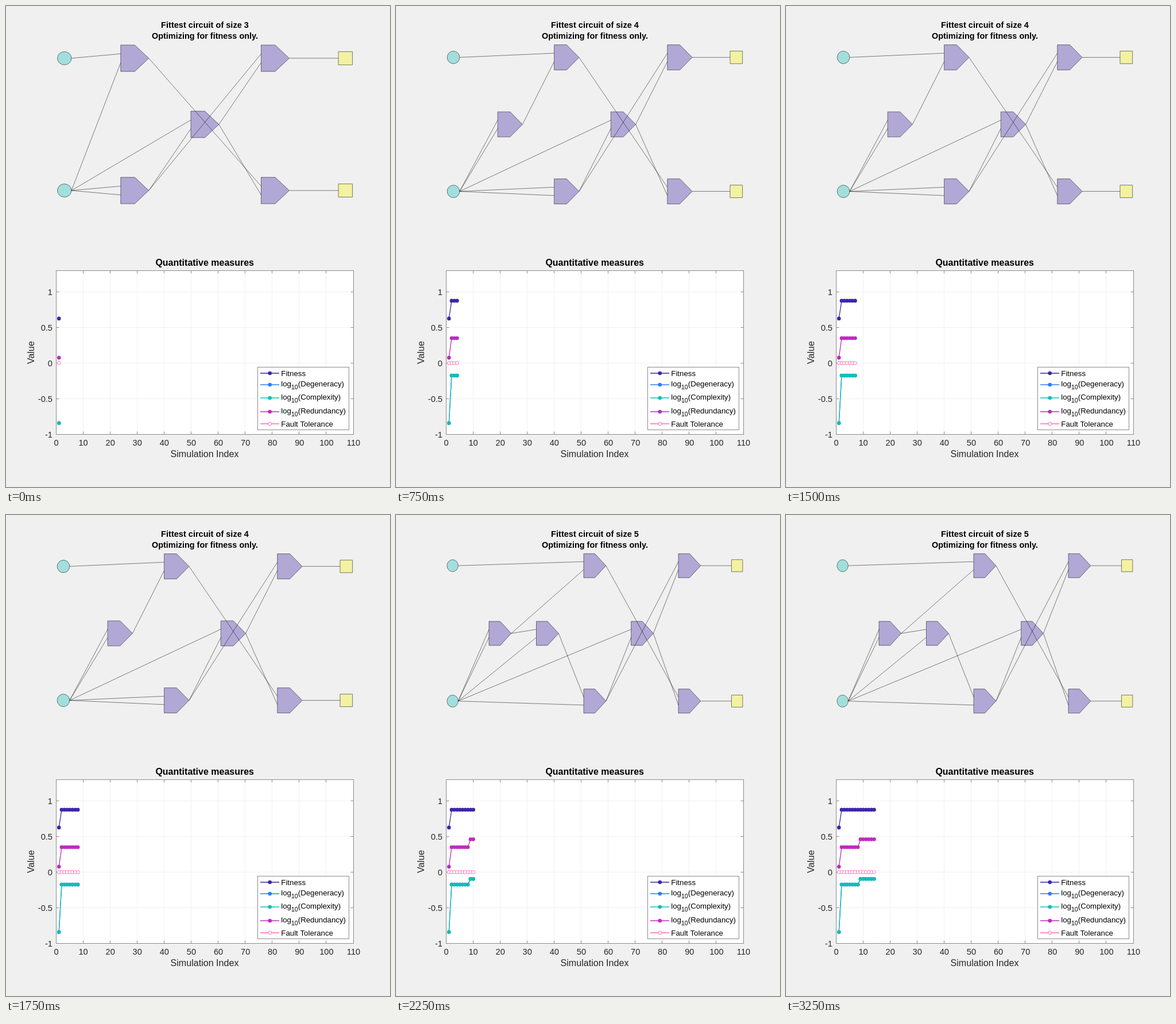
These frames come from a looping animation (669 px wide and 837 px high, 3500 ms). An HTML page with a canvas:

```html
<!DOCTYPE html>
<html lang="en">
<head>
<meta charset="utf-8">
<title>Fittest circuit</title>
<style>
  html, body { margin: 0; width: 100%; height: 100%; overflow: hidden; background: #f0f0f0; }
  canvas { display: block; }
</style>
</head>
<body>
<canvas id="stage" width="669" height="837"></canvas>
<script>
const ctx = document.getElementById('stage').getContext('2d');
const STEP = 250, STEPS = 14;
const FONT = '"Liberation Sans", Arial, sans-serif';
const MID = 206;

// Gates: [left edge, row]. Wires: from node, to gate, input 0 (upper) or 1 (lower).
const CIRCUITS = [
  {
    size: 3, from: 1, w: 48.9, h: 46, dy: 115.1, inX: 101.8, outX: 579.1,
    gates: { A: [199.8, -1], C: [199.8, 1], M: [322, 0], P: [444.5, -1], Q: [444.5, 1] },
    wires: 'aA0 bA1 bM0 bC0 bC1 AQ0 CM1 CP0 MP1 MQ1'
  },
  {
    size: 4, from: 2, w: 43.3, h: 43.7, dy: 116.6, inX: 100, outX: 582,
    gates: { A: [275.6, -1], B: [177.1, 0], C: [275.6, 1], M: [374.3, 0], P: [472.8, -1], Q: [472.8, 1] },
    wires: 'aA0 bB0 bB1 BA1 bM0 bC0 bC1 AQ0 CM1 CP0 MP1 MQ1'
  },
  {
    size: 5, from: 9, w: 38.8, h: 41.9, dy: 117.8, inX: 98.6, outX: 584.5,
    gates: { A: [327, -1], B: [162, 0], C: [327, 1], E: [244.5, 0], M: [409.6, 0], P: [492, -1], Q: [492, 1] },
    wires: 'aA0 bB0 bB1 BA1 BE0 bE1 bM0 EC0 bC1 AQ0 CM1 CP0 MP1 MQ1'
  }
];

// levels: [first index, value]
const SERIES = [
  { name: 'Fitness', color: '#3e26a8', y: 639, levels: [[1, .625], [2, .875]] },
  { name: '(Degeneracy)', log: true, color: '#2e7cf9', y: 659, levels: [[1, -.842], [2, -.175], [9, -.096]] },
  { name: '(Complexity)', log: true, color: '#12beb9', y: 682, levels: [[1, -.842], [2, -.175], [9, -.096]] },
  { name: '(Redundancy)', log: true, color: '#bf2bbf', y: 706, levels: [[1, .075], [2, .35], [9, .46]] },
  { name: 'Fault Tolerance', color: '#ff69b4', hollow: true, y: 727, levels: [[1, 0]] }
];

const BOX = { x: 87.5, y: 460.5, w: 518, h: 285 };
const px = v => BOX.x + v * BOX.w / 110;
const py = v => 621.4 - v * 124;
const latest = (list, n, key) => list.filter(item => item[key] <= n).pop();

function text(str, x, y, size, { align = 'center', color = '#000', bold = false } = {}) {
  ctx.font = `${bold ? 'bold ' : ''}${size}px ${FONT}`;
  ctx.textAlign = align;
  ctx.fillStyle = color;
  ctx.fillText(str, x, y);
}

function path(points, closed) {
  ctx.beginPath();
  points.forEach(([x, y]) => ctx.lineTo(x, y));
  if (closed) ctx.closePath();
}

function line(points, color, width) {
  path(points);
  ctx.strokeStyle = color;
  ctx.lineWidth = width;
  ctx.stroke();
}

function paint(fill) {
  ctx.fillStyle = fill;
  ctx.fill();
  ctx.strokeStyle = '#000';
  ctx.lineWidth = .5;
  ctx.stroke();
}

function drawCircuit(c) {
  const { w, h, gates } = c;
  const rowY = row => MID + row * c.dy;

  for (const row of [-1, 1]) {
    const y = rowY(row);
    ctx.beginPath();
    ctx.ellipse(c.inX, y, w / 4, h / 4, 0, 0, Math.PI * 2);
    paint('#a2dfdc');
    ctx.beginPath();
    ctx.rect(c.outX, y - h / 4, w / 2, h / 2);
    paint('#f2f2a2');
  }
  for (const [x, row] of Object.values(gates)) {
    const y = rowY(row), top = y - h / 2, bottom = y + h / 2;
    path([[x, top], [x + w / 2, top], [x + w, y], [x + w / 2, bottom], [x, bottom]], true);
    paint('#b1a8d6');
  }

  const output = id => {
    if (id === 'a' || id === 'b') return [c.inX + w / 4, rowY(id === 'a' ? -1 : 1)];
    const [x, row] = gates[id];
    return [x + w, rowY(row)];
  };
  const input = (id, pin) => {
    const [x, row] = gates[id];
    return [x, rowY(row) + (pin === '0' ? -h : h) / 6];
  };
  for (const [src, dst, pin] of c.wires.split(' ')) {
    line([output(src), input(dst, pin)], '#000', .5);
  }
  for (const id of 'PQ') {
    const end = output(id);
    line([end, [c.outX, end[1]]], '#000', .5);
  }

  text(`Fittest circuit of size ${c.size}`, 346.5, 38, 14.55, { bold: true });
  text('Optimizing for fitness only.', 346.5, 56.5, 14.45, { bold: true });
}

function drawAxes() {
  const { x, y, w, h } = BOX, right = x + w, bottom = y + h;
  const dark = '#262626', edge = '#8c8c8c', grid = '#f1f1f1';
  ctx.fillStyle = '#fff';
  ctx.fillRect(x, y, w, h);

  for (let v = 0; v <= 110; v += 10) {
    const gx = Math.round(px(v)) - .5 + (v % 110 ? 0 : .5 - px(v) % 1 + .5);
    if (v % 110) {
      line([[gx, y], [gx, bottom]], grid, 1);
      line([[gx, y], [gx, y + 5]], edge, 1);
      line([[gx, bottom], [gx, bottom - 5]], edge, 1);
    }
    text(v, px(v), 764.5, 14.67, { color: dark });
  }
  for (let v = -1; v <= 1; v += .5) {
    const gy = Math.floor(py(v)) + .5;
    if (v > -1) {
      line([[x, gy], [right, gy]], grid, 1);
      line([[x, gy], [x + 5, gy]], edge, 1);
      line([[right, gy], [right - 5, gy]], edge, 1);
    }
    text(v, 81, gy + 5, 14.67, { align: 'right', color: dark });
  }
  ctx.strokeStyle = edge;
  ctx.lineWidth = 1;
  ctx.strokeRect(x, y, w, h);

  text('Quantitative measures', 346.2, 452, 16, { bold: true });
  text('Simulation Index', 346, 784.5, 16.1, { color: dark });
  ctx.save();
  ctx.translate(48.5, 603);
  ctx.rotate(-Math.PI / 2);
  text('Value', 0, 0, 16.1, { color: dark });
  ctx.restore();
}

function marker(x, y, s) {
  ctx.beginPath();
  ctx.arc(x, y, s.hollow ? 2.9 : 3.3, 0, Math.PI * 2);
  ctx.fillStyle = s.hollow ? '#fff' : s.color;
  ctx.fill();
  if (!s.hollow) return;
  ctx.strokeStyle = s.color;
  ctx.lineWidth = 1;
  ctx.stroke();
}

function drawSeries(s, count) {
  const points = Array.from({ length: count }, (_, i) =>
    [px(i + 1), py(latest(s.levels, i + 1, 0)[1])]);
  line(points, s.color, 1.3);
  points.forEach(([x, y]) => marker(x, y, s));
}

function drawLegend() {
  ctx.fillStyle = '#fff';
  ctx.fillRect(438.5, 628.5, 159, 109);
  ctx.strokeStyle = '#8c8c8c';
  ctx.lineWidth = 1;
  ctx.strokeRect(438.5, 628.5, 159, 109);

  const left = { align: 'left' };
  for (const s of SERIES) {
    line([[443, s.y], [476, s.y]], s.color, 1.3);
    marker(459.7, s.y, s);
    let x = 479.3;
    const base = s.y + (s.log ? 3.2 : 5);
    const put = (str, y, size) => {
      text(str, x, y, size, left);
      x += ctx.measureText(str).width;
    };
    if (s.log) {
      put('log', base, 13.25);
      put('10', base + 5, 10.6);
    }
    put(s.name, base, 13.25);
  }
}

function frame(now) {
  const count = Math.floor(now / STEP) % STEPS + 1;
  ctx.fillStyle = '#f0f0f0';
  ctx.fillRect(0, 0, 669, 837);
  drawCircuit(latest(CIRCUITS, count, 'from'));
  drawAxes();
  SERIES.forEach(s => drawSeries(s, count));
  drawLegend();
}

let start;
function tick(now) {
  start ??= now;
  frame(now - start);
  requestAnimationFrame(tick);
}
frame(0);
requestAnimationFrame(tick);
</script>
</body>
</html>
```
